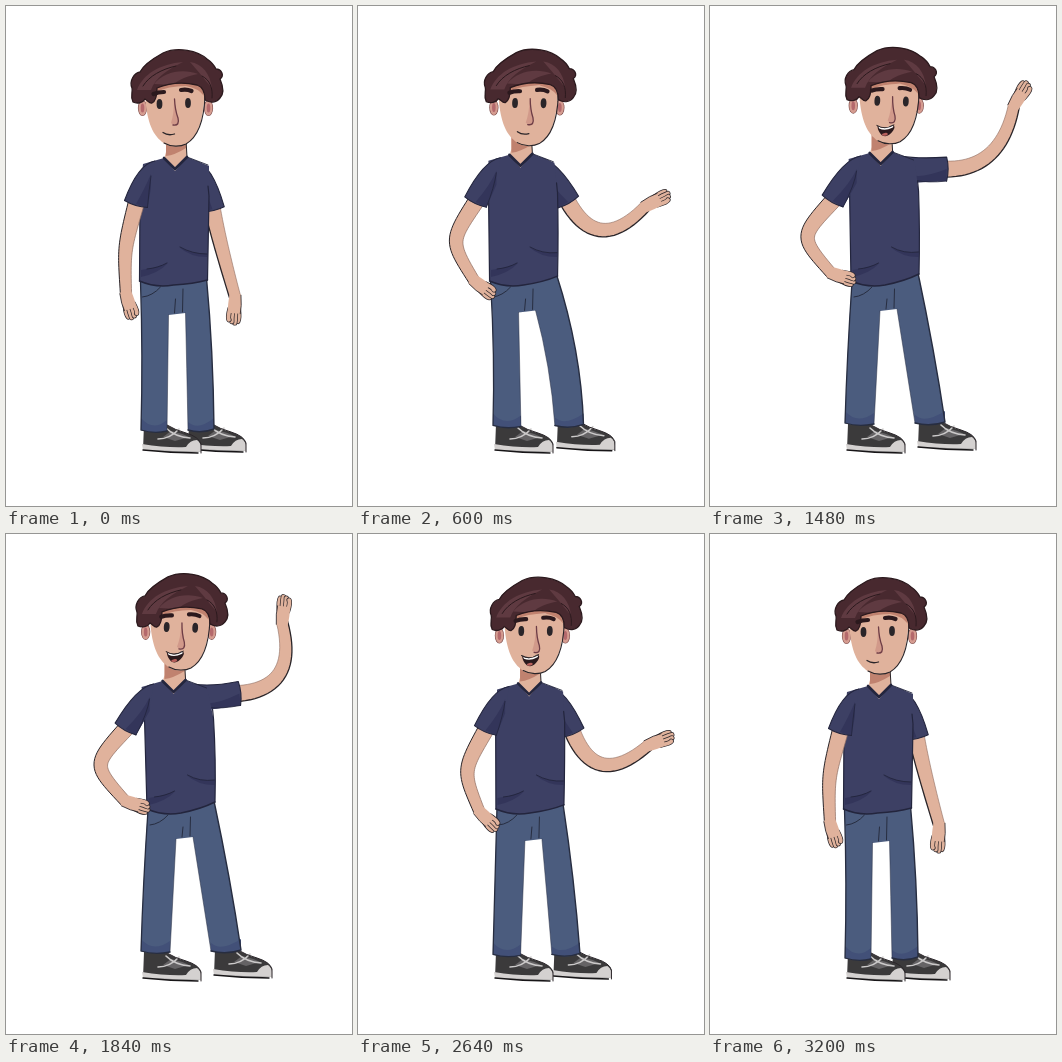
These frames come from a looping animation (346 by 500 pixels, 3.92 s). An HTML page with a canvas:

```html
<!DOCTYPE html>
<html lang="en">
<head>
<meta charset="utf-8">
<title>Waving character</title>
<style>
  html, body { margin: 0; width: 100%; height: 100%; overflow: hidden; background: #fff; }
  canvas { display: block; width: 346px; height: 500px; }
</style>
</head>
<body>
<canvas id="stage"></canvas>
<script>
const LOOP = 3920, MOVE = 3200, STEP = 40;
const canvas = document.getElementById('stage');
const ctx = canvas.getContext('2d');
const dpr = window.devicePixelRatio || 1;
canvas.width = 346 * dpr;
canvas.height = 500 * dpr;

const SKIN = '#e0b29c', SKIN_DARK = '#c0826f', INK = '#2a2529';
const SHIRT = '#3d4064', SHIRT_DARK = '#33355a', SHIRT_INK = '#23253d';
const JEANS = '#4b5c7e', JEANS_DARK = '#425078', JEANS_INK = '#272d40';
const HAIR = '#48292f', HAIR_LIGHT = '#5f3a41', HAIR_INK = '#2b191d';

const ease = u => { u = Math.max(0, Math.min(1, u)); return u * u * (3 - 2 * u); };
// Rises from a to b, falls from c to d
const span = (t, a, b, c, d) => ease((t - a) / (b - a)) * (1 - ease((t - c) / (d - c)));
const polar = (p, deg, len) =>
  [p[0] + len * Math.cos(deg * Math.PI / 180), p[1] + len * Math.sin(deg * Math.PI / 180)];

// Swings back and forth, ends on +1 at 2200 ms, then dies away
function swing(t, period) {
  if (t > 2200) return 1 - ease((t - 2200) / 900);
  return ease((t - 1040) / 700) * Math.cos(2 * Math.PI * (t - 2200) / period);
}

function pose(t) {
  const k = span(t, 0, 1000, 2200, 3100);
  const hip = span(t, 400, 1400, 2200, 3200);
  const dip = t < 1000 ? Math.sin(Math.PI * t / 1000) ** 2 : 0;
  const sway = swing(t, 900), wave = swing(t, 1400);
  const bend = span(t, 0, 440, 2600, 3200), lift = span(t, 400, 1080, 2200, 2760);
  const dy = -5 * k;
  const nx = 169 + k - 8 * dip + 3 * sway;
  const px = 167.5 + 7.5 * hip - 3 * dip;

  const upper = 78 - 84 * lift - 9 * wave * lift;
  const fore = 74 - 105 * bend - 75 * lift - 40 * wave * lift;
  const curl = (upper - fore) / 108;
  const shoulder = [nx + 30, 168 + dy];
  const elbow = polar(shoulder, upper, 70 + 28 * curl);
  const wrist = polar(elbow, fore, 55 + 13 * curl);
  const right = {
    sleeve: polar(shoulder, upper, 36), elbow, wrist,
    tip: polar(wrist, fore + 20, 30), sharp: 2 / 3, side: 1
  };

  const leftWrist = [120 + 0.6 * (nx - 169), 288 - 21 * k];
  const left = {
    sleeve: [nx - 39 - 9 * k, 198 - 3 * k],
    elbow: [nx - 51 - 30 * k, 243 - 12 * k],
    wrist: leftWrist, tip: polar(leftWrist, 73 - 55 * k, 28), sharp: 1, side: -1
  };

  const head = {
    x: 9 * k + 5 * sway - 5 * dip,
    y: -2.7 * k + 1.7 * sway + 1.5 * dip,
    turn: 3 * k + 1.5 * sway,
    talk: (t >= 1400 && t < 2040) || (t >= 2400 && t < 2900)
  };
  return { k, dip, dy, nx, px, right, left, head };
}

function fill(path, color) { ctx.fillStyle = color; ctx.fill(new Path2D(path)); }
function line(path, color, width) {
  ctx.strokeStyle = color;
  ctx.lineWidth = width;
  ctx.stroke(new Path2D(path));
}
function oval(x, y, rx, ry, color, angle = 0) {
  ctx.beginPath();
  ctx.ellipse(x, y, rx, ry, angle, 0, 7);
  ctx.fillStyle = color;
  ctx.fill();
}
function at(x, y, draw) {
  ctx.save();
  ctx.translate(x, y);
  draw();
  ctx.restore();
}

function hand(wrist, tip, flip) {
  const dx = tip[0] - wrist[0], dy = tip[1] - wrist[1], len = Math.hypot(dx, dy);
  at(wrist[0], wrist[1], () => {
    ctx.rotate(Math.atan2(dy, dx));
    ctx.scale(1, flip);
    for (let i = -1.5; i < 2; i++) {
      const end = len * (0.95 - 0.06 * Math.abs(i + 0.3));
      const finger = `M${len * 0.4} ${i * 2.8} Q${len * 0.7} ${i * 4} ${end - 2} ${i * 3}`;
      line(finger, INK, 5.2);
      line(finger, SKIN, 3.8);
    }
    fill(`M-3 -5.5 Q${len * 0.3} -7.5 ${len * 0.55} -6 L${len * 0.55} 6 Q${len * 0.3} 7 -3 5.5 Z`, SKIN);
    line(`M-2 -5.8 Q${len * 0.3} -7.5 ${len * 0.55} -6.4`, INK, 0.8);
  });
}

function arm({ sleeve, elbow, wrist, tip, sharp, side }) {
  const toward = p => p.map((v, i) => v + (elbow[i] - v) * sharp);
  const c1 = toward(sleeve), c2 = toward(wrist);
  const outer = [], inner = [];
  for (let n = -1; n <= 24; n++) {
    const u = n / 24, v = 1 - u;
    const p = [0, 1].map(i => v * v * v * sleeve[i] + 3 * u * v * v * c1[i]
      + 3 * u * u * v * c2[i] + u * u * u * wrist[i]);
    const d = [0, 1].map(i => v * v * (c1[i] - sleeve[i]) + 2 * u * v * (c2[i] - c1[i])
      + u * u * (wrist[i] - c2[i]));
    const w = side * (8 - 2.4 * u) / (Math.hypot(d[0], d[1]) || 1);
    outer.push([p[0] - d[1] * w, p[1] + d[0] * w]);
    inner.push([p[0] + d[1] * w, p[1] - d[0] * w]);
  }
  fill('M' + outer.concat(inner.slice().reverse()).join('L') + 'Z', SKIN);
  line('M' + inner.join('L'), side > 0 ? '#8d6c60' : INK, side > 0 ? 0.6 : 1);
  line('M' + outer.join('L'), side > 0 ? INK : '#8d6c60', side > 0 ? 1.3 : 0.7);
  hand(wrist, tip, side);
}

function sleeve(nx, dy, { sleeve: end, side }) {
  const ax = nx + side * 30, ay = 168 + dy;
  const dx = end[0] - ax, dz = end[1] - ay, len = Math.hypot(dx, dz);
  const px = side * dz / len * 12, py = -side * dx / len * 12;
  const out = `${end[0] + px} ${end[1] + py}`, inn = `${end[0] - px} ${end[1] - py}`;
  const top = `M${nx + side * 20} ${155 + dy} Q${nx + side * 37} ${158 + dy} ${out}`;
  const cuff = `Q${end[0] + dx / len * 3} ${end[1] + dz / len * 3} ${inn}`;
  const pit = `L${nx + side * 24} ${182 + dy}`;
  fill(top + cuff + pit + 'Z', SHIRT);
  fill(`M${inn} L${end[0]} ${end[1]} Q${ax} ${ay + 14} ${nx + side * 24} ${168 + dy} ${pit} Z`, SHIRT_DARK);
  line(top + cuff, SHIRT_INK, 1.1);
  line(`M${inn} Q${nx + side * 26} ${184 + dy} ${nx + side * 24} ${170 + dy}`, SHIRT_INK, 0.8);
}

function shoe(x, y) {
  at(x, y, () => {
    fill('M1 -28 L24 -27 Q32 -22 43 -19 Q56 -15 58 -8 L58 0 L0 -2 Z', '#3b3a3b');
    fill('M20 -15 L28 -21 Q38 -19 46 -15 L32 -11 Z', '#656365');
    fill('M-1 -8 Q24 -4 43 -5 Q47 -12 54 -12 Q59 -9 58 0 L0 -2 Z', '#d4d1d0');
    line('M15 -13 Q27 -13 36 -23 M23 -24 Q32 -15 47 -14', '#cbc9c9', 1.6);
    line('M24 -27 Q32 -22 43 -19 Q56 -15 58 -8 L58 1', INK, 1);
    line('M0 -2 Q28 1 55 1', '#171517', 1.4);
  });
}

function legs(px, k, dip) {
  const L = px - 33, R = px + 33, inL = 161 + 3 * k, inR = 182 + 23 * k, outR = 208 + 27 * k;
  const yL = 425 - 7 * k, yR = 424 - 7 * k, cy = 309 - 4 * k;
  const outer = `M${R} ${272 - 5 * k} Q${(R + outR) / 2 + 3 + 9 * dip} 345 ${outR} ${yR - 1}`;
  const cuffR = `Q${(inR + outR) / 2} ${yR + 4} ${inR} ${yR}`;
  const cuffL = `Q148 ${yL + 3} 135 ${yL - 1}`;
  const inner = `Q${(inR + px + 12) / 2 + 6 * dip} 360 ${px + 12} ${cy - 2}`;
  fill(outer + cuffR + inner + `L${px - 5} ${cy} L${inL} ${yL} ${cuffL} Q137 350 ${L} 272 Z`, JEANS);
  fill(`M${outR} ${yR - 12} L${outR} ${yR - 1} ${cuffR} L${inR} ${yR - 8}
    Q${inR + 10} ${yR + 1} ${outR} ${yR - 12} Z`, JEANS_DARK);
  fill(`M${inL} ${yL - 11} L${inL} ${yL} ${cuffL} L135 ${yL - 13} Q147 ${yL + 1} ${inL} ${yL - 11} Z`, JEANS_DARK);
  line(outer + cuffR, JEANS_INK, 1.4);
  line(`M${inR} ${yR}` + inner + `M${px - 5} ${cy} L${inL} ${yL}`, JEANS_INK, 0.5);
  line(`M${L} 276 Q137 350 135 ${yL - 1} M${inL} ${yL} ${cuffL}`, JEANS_INK, 1.3);
  line(`M${px + 2} 293 L${px + 1} ${cy - 2} M${px + 9.5} 283 L${px + 9} ${cy - 3}
    M${L + 2} 291 Q${L + 12} 290 ${L + 20} 281`, JEANS_INK, 1);
}

function torso(nx, px, k, dy) {
  const cx = (nx + 2 * px) / 3, L = px - 34, R = px + 34, hemR = 274 - 6 * k;
  const left = `${cx - 34} ${190 + dy}`, right = `${cx + 35} ${190 + dy}`;
  const hem = `M${L} 275 Q${px - 18} 282 ${px} 279 Q${px + 20} ${278 - 3 * k} ${R} ${hemR}`;
  fill(`${hem} Q${R + 1} 225 ${right} L${nx + 34} ${160 + dy} L${nx + 12} ${151 + dy}
    L${nx} ${165 + dy} L${nx - 11} ${152 + dy} L${nx - 32} ${158 + dy} L${left} Z`, SHIRT);
  at(px - 167.5, 0, () => {
    fill('M135 264 Q150 262 162 257 Q153 267 135 271 Z', SHIRT_DARK);
    fill(`M173 241 Q186 248 201 ${248 - 2 * k} L201 251 Q184 251 173 241 Z`, SHIRT_DARK);
    line(`M141 263 Q152 262 161 257 M174 241 Q186 248 201 ${248 - 2 * k}`, SHIRT_INK, 0.9);
  });
  line(hem, SHIRT_INK, 1.5);
  line(`M${R} ${hemR} Q${R + 1} 225 ${right} L${cx + 34} ${180 + dy} M${left} L${L} 275`, SHIRT_INK, 1.2);
  line(`M${nx + 12} ${151 + dy} L${nx + 33} ${159 + dy}`, SHIRT_INK, 0.9);
  line(`M${nx - 11} ${152 + dy} L${nx} ${163 + dy} L${nx + 12} ${151 + dy}`, SHIRT_INK, 2.6);
}

function neck(nx, dy) {
  at(nx, dy, () => {
    fill('M-9 128 L11 128 L12 152 L0 165 L-11 153 L-9 146 Z', SKIN);
    fill('M-9 128 L11 128 L11 142 Q0 149 -9 150 Z', SKIN_DARK);
    line('M11 134 L12 151', INK, 1);
  });
}

function mouth(open) {
  if (!open) return line('M157 126.5 Q162 130 168.5 128', INK, 1.3);
  fill('M155 123 Q163 127 170 121 Q174 122 171 127 Q166 135 160 132 Q156 129 155 123 Z', '#2b1a1d');
  fill('M156 123.5 Q163 127 170 121.5 Q172 123 170 124 Q163 128 157 125.5 Z', '#fff');
  oval(163, 131, 3, 1.4, '#b8605c', -0.2);
  line('M154.5 122.5 Q163 127 171.5 121', INK, 1);
}

function face(k, open) {
  ctx.translate(168, 105);
  ctx.rotate(0.06 * k);
  ctx.translate(-168, -105);
  oval(153.5, 98, 2.9, 5, INK);
  oval(182, 97, 2.9, 5, INK);
  line('M147.5 88 Q152 86 158 86', HAIR_INK, 4.2);
  line('M175 84 Q181 83 185.5 85', HAIR_INK, 4.2);
  fill('M168 94 Q168 108 165 117 Q168 121 172 119 Q174 116 171 108 Z', '#d1998a');
  line('M168.5 93 Q169 104 172 112 Q174 120 167 119', '#6d3d46', 1.3);
  mouth(open);
}

const HAIR_PATH = `M127 96 C124 90 127 86 126 82 C123 75 128 67 134 66 C138 58 148 52 157 47
  C172 40 192 45 201 53 C207 57 209 61 210 63 C215 63 219 69 214 73 C217 80 218 88 214 92
  C210 97 204 97 199 94 C199 87 197 81 191 79 C178 76 163 77 151 82 C151 89 150 95 146 97
  C144 98 141 94 139 93 C137 97 131 98 127 96 Z`;

function hair() {
  fill(HAIR_PATH, HAIR);
  ctx.save();
  ctx.clip(new Path2D(HAIR_PATH));
  fill('M131 84 C137 68 154 58 177 56 C161 64 149 72 145 84 Z', HAIR_LIGHT);
  fill('M148 78 C158 66 176 62 192 68 C182 70 173 73 167 79 Z', HAIR_LIGHT);
  fill('M184 56 C197 58 204 68 206 82 C199 74 193 66 184 56 Z', HAIR_LIGHT);
  line('M137 80 C143 70 156 63 170 60 M196 70 C204 74 207 82 206 92', HAIR_INK, 1);
  ctx.restore();
  line(HAIR_PATH, HAIR_INK, 1.3);
}

function drawHead({ x, y, turn, talk }, k) {
  at(x, y, () => {
    for (const ex of [136.5, 202.5]) {
      oval(ex - turn, 102, 4.6, 8, '#7a4c4b');
      oval(ex - turn, 102, 4, 7.4, '#d59c90');
      oval(ex - turn, 102, 1.8, 4.5, '#b4696c');
    }
    fill('M139 80 C139 110 145 126 154 134 C162 142 172 142 180 138 C192 131 198 115 199 80 Z', SKIN);
    line('M158 137 C165 141 174 141 180 138 C192 131 198 115 199 90', INK, 1.1);
    fill('M148 76 L194 76 L198 90 Q192 82 180 80 Q162 80 150 86 Z', SKIN_DARK);
    hair();
    at(turn, 0, () => face(k, talk));
  });
}

function draw(t) {
  const { k, dip, dy, nx, px, right, left, head } = pose(t);
  ctx.setTransform(dpr, 0, 0, dpr, 0, 0);
  ctx.fillStyle = '#fff';
  ctx.fillRect(0, 0, 346, 500);
  ctx.lineCap = ctx.lineJoin = 'round';

  arm(right);
  sleeve(nx, dy, right);
  shoe(182 + 26 * k, 445 - 2 * k);
  shoe(137, 446);
  legs(px, k, dip);
  neck(nx, dy);
  torso(nx, px, k, dy);
  arm(left);
  sleeve(nx, dy, left);
  drawHead(head, k);
}

const begin = performance.now();
function tick() {
  const t = (performance.now() - begin) % LOOP;
  draw(Math.min(MOVE, Math.floor(t / STEP) * STEP));
  requestAnimationFrame(tick);
}
tick();
</script>
</body>
</html>
```
